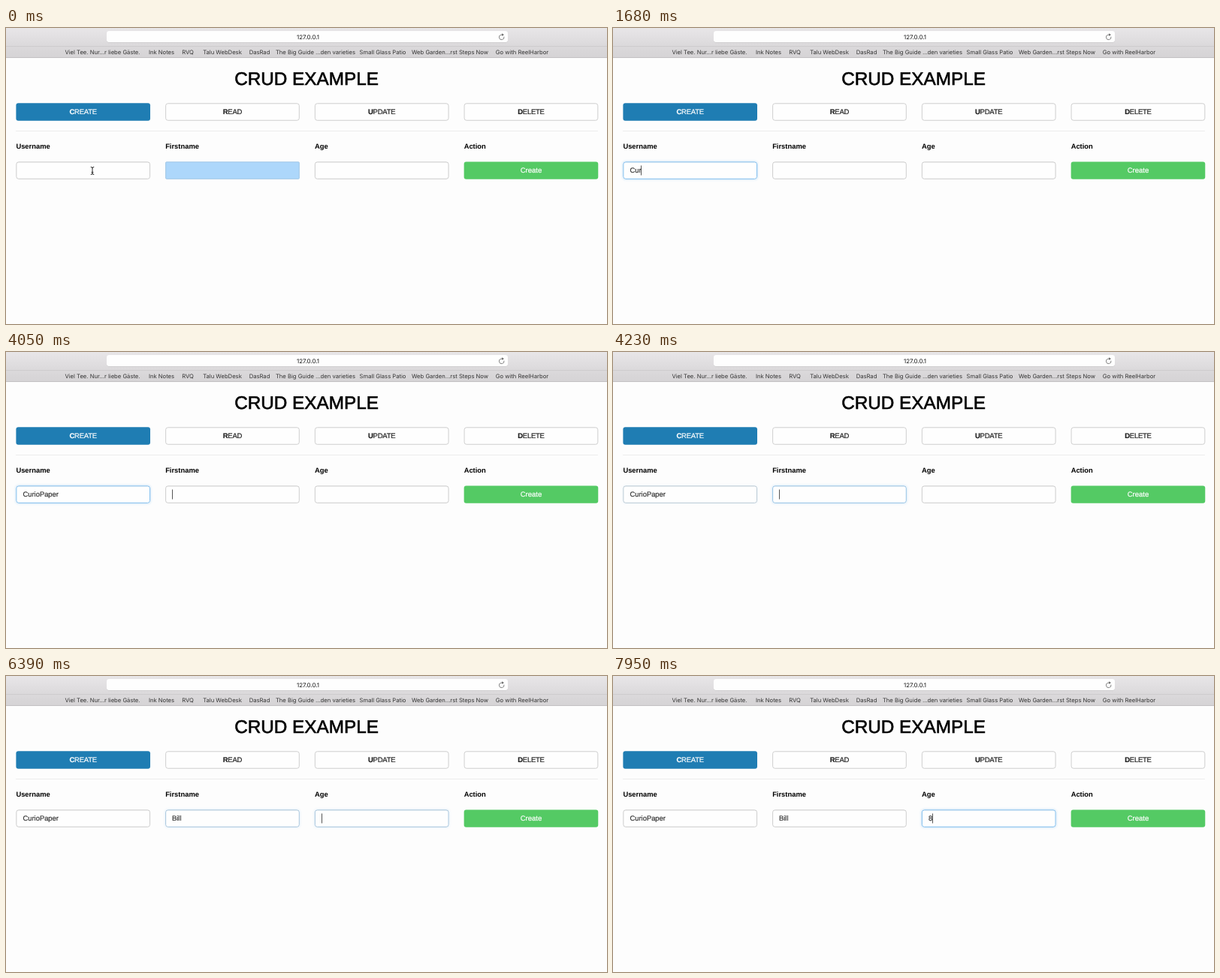
An HTML page with a canvas for the animation above (8 s loop, 800 px wide and 395 px high).

```html
<!DOCTYPE html>
<html lang="en">
<head>
<meta charset="utf-8">
<title>CRUD example</title>
<style>
  html, body { margin: 0; width: 100%; height: 100%; overflow: hidden; background: #fdfdfd; }
  canvas, svg { position: absolute; left: 0; top: 0; width: 800px; height: 395px; }
  text {
    font-family: "Liberation Sans", Arial, sans-serif;
    white-space: pre;
    text-rendering: geometricPrecision;
    stroke-width: .2px;
  }
  .bar { font-family: Inter, Roboto, sans-serif; font-size: 7.65px; fill: #333; text-anchor: middle; }
  .url { font-family: Inter, Roboto, sans-serif; font-size: 7.9px; fill: #111; text-anchor: middle; }
  .title { font-size: 24.3px; fill: #000; stroke: #000; stroke-width: .6px; text-anchor: middle; }
  .tab { font-size: 9.5px; letter-spacing: -.025em; fill: #222; stroke: #222; text-anchor: middle; }
  .tab tspan { font-weight: bold; }
  .label { font-size: 9.4px; font-weight: bold; fill: #000; }
  .submit { font-size: 9.5px; text-anchor: middle; }
  .light { fill: #fff; stroke: #fff; }
  .value { font-size: 9.4px; fill: #333; stroke: #333; }
</style>
</head>
<body>
<canvas id="stage"></canvas>
<svg id="words" viewBox="0 0 800 395"></svg>
<script>
const LOOP = 8000;
const COLS = [0, 1, 2, 3].map(i => 13.4 + 198.75 * i);
const COL_W = 178.6, BOX_H = 23.4;
const TAB_Y = 100.3, FIELD_Y = 178.4;

// Each field: text start, moment of focus, fade length, text and key press times.
const fields = [
  { x: 22.5, start: 240, fade: 270, text: "CurioPaper",
    keys: [1020, 1260, 1680, 1860, 2130, 2640, 2850, 3150, 3360, 3570] },
  { x: 221, start: 4050, fade: 270, text: "Bill", keys: [5070, 5430, 5760, 5940] },
  { x: 420, start: 6270, fade: 240, text: "8", keys: [7950] }
];
const caretOff = [[4950, 5070], [7170, 7950]];

const canvas = document.getElementById("stage");
const words = document.getElementById("words");
const ctx = canvas.getContext("2d");
const dpr = window.devicePixelRatio || 1;
canvas.width = 800 * dpr;
canvas.height = 395 * dpr;

function addText(cls, x, y, str) {
  const el = document.createElementNS("http://www.w3.org/2000/svg", "text");
  el.setAttribute("class", cls);
  el.setAttribute("x", x);
  el.setAttribute("y", y);
  el.textContent = str;
  words.appendChild(el);
  return el;
}

function addWords() {
  addText("url", 402, 15, "127.0.0.1");
  [
    [128.5, "Viel Tee. Nur...r liebe Gäste."],
    [207, "Ink Notes"],
    [242, "RVQ"],
    [288, "Talu WebDesk"],
    [337.5, "DasRad"],
    [412, "The Big Guide ...den varieties"],
    [501.5, "Small Glass Patio"],
    [591, "Web Garden...rst Steps Now"],
    [687, "Go with ReelHarbor"]
  ].forEach(([x, str]) => addText("bar", x, 34.5, str));

  addText("title", 400, 75.6, "CRUD EXAMPLE");
  ["CREATE", "READ", "UPDATE", "DELETE"].forEach((name, i) => {
    const el = addText("tab" + (i ? "" : " light"), COLS[i] + COL_W / 2, 115.4, "");
    const first = document.createElementNS(el.namespaceURI, "tspan");
    first.textContent = name[0];
    el.append(first, name.slice(1));
  });
  ["Username", "Firstname", "Age", "Action"].forEach((name, i) =>
    addText("label", COLS[i], 161.4, name));
  addText("submit light", COLS[3] + COL_W / 2, 193.4, "Create");
  fields.forEach(f => { f.el = addText("value", f.x, 193.3, ""); });
}

// Rounded box; the border lies just inside the edge.
function box(x, y, w, h, r, fill, border) {
  const line = 0.9, d = border ? line / 2 : 0;
  ctx.beginPath();
  ctx.roundRect(x + d, y + d, w - 2 * d, h - 2 * d, r);
  if (fill) { ctx.fillStyle = fill; ctx.fill(); }
  if (border) { ctx.strokeStyle = border; ctx.lineWidth = line; ctx.stroke(); }
}

function rect(x, y, w, h, color) {
  ctx.fillStyle = color;
  ctx.fillRect(x, y, w, h);
}

function mix(a, b, p) {
  return "rgb(" + a.map((v, i) => Math.round(v + (b[i] - v) * p)) + ")";
}

function ease(p) {
  p = Math.max(0, Math.min(1, p));
  return p * p * (3 - 2 * p);
}

function drawBrowser() {
  const g = ctx.createLinearGradient(0, 0, 0, 40);
  g.addColorStop(0, "#e8e6e8");
  g.addColorStop(0.6, "#dbd9db");
  g.addColorStop(1, "#d5d3d5");
  rect(0, 0, 800, 40, g);
  rect(0, 24, 800, 1, "#cecccd");
  rect(0, 39, 800, 1, "#c3c1c3");
  box(134, 4.5, 534, 15, 3, "#c2c0c2");
  box(134, 4, 534, 15, 3, "#fefefe");

  // reload arrow
  ctx.strokeStyle = ctx.fillStyle = "#666";
  ctx.lineWidth = 0.8;
  ctx.beginPath();
  ctx.arc(659.7, 12.3, 3.3, -0.2, -1.25, false);
  ctx.stroke();
  ctx.beginPath();
  ctx.moveTo(660, 7.2);
  ctx.lineTo(663, 9);
  ctx.lineTo(660.2, 10.8);
  ctx.fill();
}

function drawPage() {
  COLS.forEach((x, i) => {
    box(x, TAB_Y, COL_W, BOX_H, 3, i ? "#fefefe" : "#1f7db3", i ? "#cacaca" : null);
  });
  rect(13, 137, 775, 1, "#ededed");
  box(COLS[3], FIELD_Y, COL_W, BOX_H, 3, "#54ca64");
}

function drawField(i, ring, lit) {
  const x = COLS[i], y = FIELD_Y;
  if (lit) {
    box(x, y, COL_W, BOX_H, 1, "#add7fb", "#9cc3e4");
    return;
  }
  if (ring > 0) {
    ctx.save();
    ctx.shadowColor = `rgba(102,175,233,${0.5 * ring})`;
    ctx.shadowBlur = 3.5 * dpr;
    box(x, y, COL_W, BOX_H, 3, "#fff");
    ctx.restore();
  }
  box(x, y, COL_W, BOX_H, 3, "#fefefe");
  rect(x + 1, y + 0.6, COL_W - 2, 1, "rgba(0,0,0,.04)");
  box(x, y, COL_W, BOX_H, 3, null, mix([200, 200, 200], [114, 183, 236], ring));
}

function drawPointer() {
  ctx.strokeStyle = "#222";
  ctx.lineWidth = 1;
  ctx.beginPath();
  for (const s of [-1, 1]) {
    ctx.moveTo(112.8, 190.5 + s * 5);
    ctx.quadraticCurveTo(115, 190.5 + s * 5, 115, 190.5 + s * 3.5);
    ctx.quadraticCurveTo(115, 190.5 + s * 5, 117.2, 190.5 + s * 5);
  }
  ctx.moveTo(115, 186.5);
  ctx.lineTo(115, 194.5);
  ctx.moveTo(113.7, 192.5);
  ctx.lineTo(116.3, 192.5);
  ctx.stroke();
}

function draw(t) {
  ctx.setTransform(dpr, 0, 0, dpr, 0, 0);
  rect(0, 0, 800, 395, "#fdfdfd");
  drawBrowser();
  drawPage();

  fields.forEach((f, i) => {
    const next = fields[i + 1];
    const gain = ease((t - f.start) / f.fade);
    const loss = next ? ease((t - next.start) / next.fade) : 0;
    drawField(i, gain - loss, i === 1 && t < 240);
    const typed = f.text.slice(0, f.keys.filter(k => t >= k).length);
    if (f.el.textContent !== typed) f.el.textContent = typed;
  });

  const active = fields.filter(f => t >= f.start).pop();
  if (active && !caretOff.some(([a, b]) => t >= a && t < b)) {
    const w = active.el.textContent ? active.el.getComputedTextLength() : 0;
    rect(Math.round(active.x + w - 0.3), 183.5, 1, 13, "#555");
  }
  if (t < 1020) drawPointer();
}

addWords();
const begin = performance.now();
function tick() {
  draw((performance.now() - begin) % LOOP);
  requestAnimationFrame(tick);
}
tick();
</script>
</body>
</html>
```
